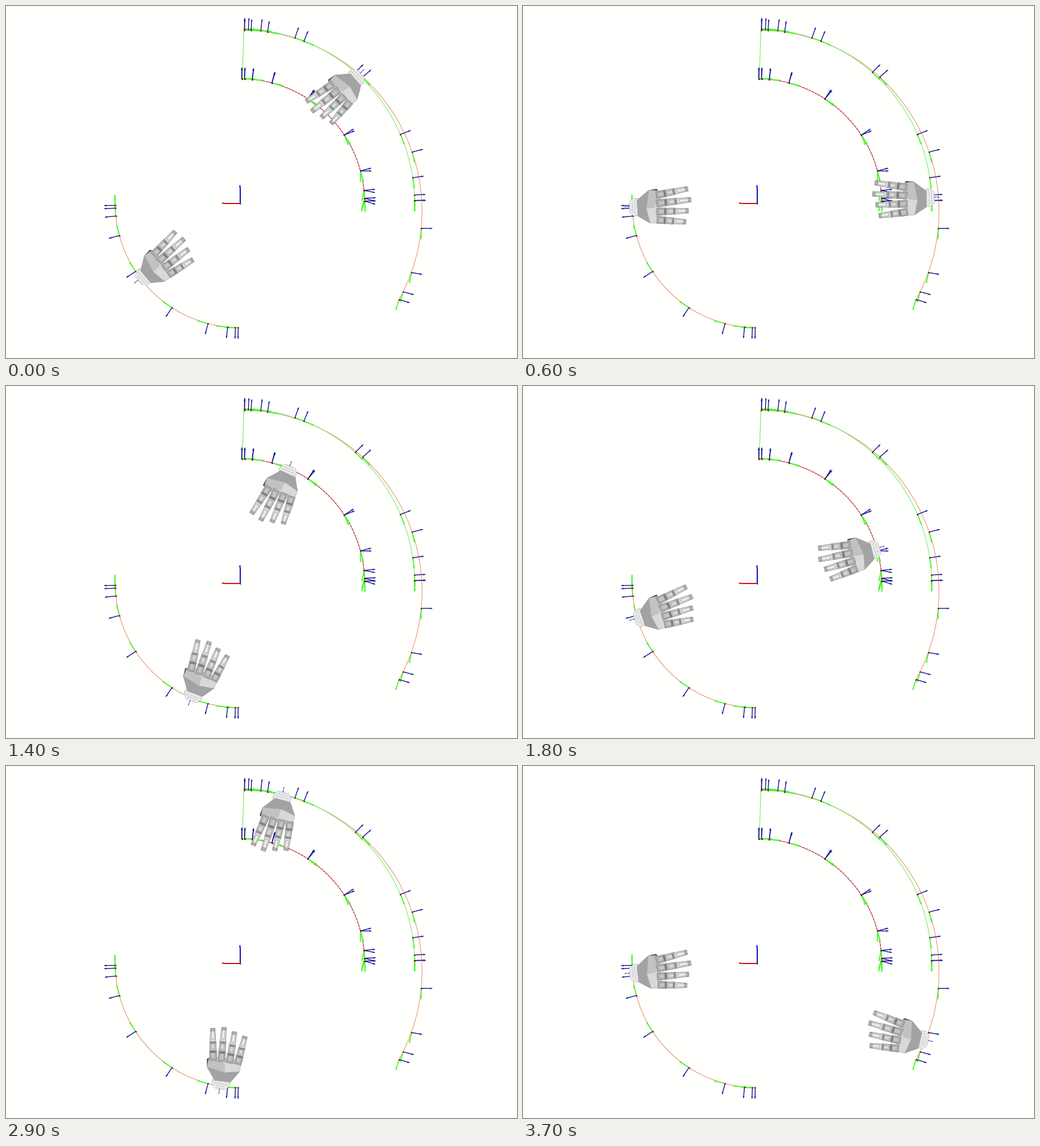
A matplotlib script for the animation above (3800 ms loop, 901 by 622 pixels).

```python
import numpy as np
import matplotlib.pyplot as plt
from matplotlib.animation import FuncAnimation
from matplotlib.patches import Polygon

W, H, DPI = 901, 622, 100
PX = 72 / DPI
CENTER = np.array([412, 348])
GREEN, NAVY, RED = "#46f828", "#0c0c96", "#d20a14"

fig = plt.figure(figsize=(W / DPI, H / DPI), dpi=DPI, facecolor="#fffffd")
ax = fig.add_axes([0, 0, 1, 1])
ax.set(xlim=(-0.5, W - 0.5), ylim=(H - 0.5, -0.5))
ax.axis("off")


def direction(deg):
    a = np.radians(deg)
    return np.array([np.cos(a), -np.sin(a)])


def ease(u, steps, rate, middle):
    """Logistic progress, 0 at u=0 and 1 at u=steps."""
    def raw(v):
        return 1 / (1 + np.exp(-rate * (v - middle)))
    return (raw(np.clip(u, 0, steps)) - raw(0)) / (raw(steps) - raw(0))


def pose(center, radius, deg, tilt=0):
    """Position on an arc and the outward heading there."""
    return np.array([*(center + radius * direction(deg)), deg + tilt])


def inner_path(u, tilt=0):
    s = ease(u, 9, 1.085, 4.5)
    return pose(CENTER, 220, 89.2 - 88.2 * s, tilt * s)


def left_path(u):
    x, y, deg = inner_path(u)
    return np.array([*(2 * CENTER - (x, y)), deg + 180])


def short_path(u):
    s = ease(u, 8, 1.23, 4.15)
    return pose(CENTER, 308, 88.5 - 87.6 * s, -4 * np.sin(np.pi * s) ** 2)


def long_path(u):
    s = ease(u, 9, 0.97, 4.63)
    return pose(CENTER + (0, 12), 318 + 4 * s, 88.6 - 118 * s,
                12 * s - 13 * np.sin(np.pi * s) ** 2)


def line(points, color, width, z=1, **kw):
    return ax.plot(*np.transpose(points), color=color, lw=width * PX, zorder=z,
                   solid_capstyle="butt", **kw)[0]


def trace(path, color, width, **kw):
    line([path(u)[:2] for u in np.linspace(0, 9, 300)], color, width, **kw)


def arrow(start, deg, length, color, width, z=3):
    d = direction(deg)
    neck, tip = start + (length - 5) * d, start + length * d
    side = np.array([-d[1], d[0]]) * (width * 0.5 + 0.8)
    line([start, neck], color, width, z)
    ax.add_patch(Polygon([neck + side, tip, neck - side], fc=color, ec="none", zorder=z))


def dot(point, color, size):
    ax.plot(*point, "o", ms=size * PX, color=color, mew=0, zorder=4)


def triad(place):
    arrow(place[:2], place[2] - 90, 20.5, GREEN, 1.8, 2)
    arrow(place[:2], place[2], 20.5, NAVY, 1.4)
    dot(place[:2], "#8c0014", 2.6)


def draw_scene():
    trace(left_path, "#e0865c", 1)
    trace(inner_path, "#e58c96", 1)
    trace(inner_path, "#a81432", 1.1, ls=(0, (4, 1.5)))
    trace(long_path, "#e8875c", 1)
    trace(short_path, "#6cf06c", 1.1)
    line([(419, 42), (416, 128)], "#74ee5c", 1.2)
    for k in range(10):
        for place in (left_path(k), inner_path(k), inner_path(k, -18),
                      long_path(k), short_path(k)):
            triad(place)
    arrow(CENTER, 90, 33, "#0a0ac8", 2)
    arrow(CENTER, 180, 33, RED, 2)
    dot(CENTER, "#0a9628", 3)


def band(base, tip, a, b, wa, wb):
    """Tapered strip between fractions a and b of a finger's axis."""
    axis = tip - base
    side = np.array([-axis[1], axis[0]]) / np.hypot(*axis) / 2
    p, q = base + a * axis, base + b * axis
    return [p - side * wa, q - side * wb, q + side * wb, p + side * wa]


def finger(i):
    base = np.array([43, -19 + 14.5 * i])
    tip = np.array([104 - 5 * abs(i - 1), -29 + 19.5 * i])
    joints = (0, 0.3, 0.58, 1)
    for j, (a, b) in enumerate(zip(joints, joints[1:])):
        wide, tone, n = 12.5 - 1.2 * j, 0.68 + 0.08 * j, (b - a) / 5
        yield band(base, tip, a, b, wide, wide - 2 * (j == 2)), tone, 0.42
        yield band(base, tip, a + n, b - n, wide - 5, wide - 6), tone + 0.09, 0.6
        yield band(base, tip, b - n, b - n / 3, wide - 3, wide - 4), 0.5 + 0.12 * j, 0.45


def hand_parts():
    """Outline as (forward, sideways) offsets from the wrist, fill grey, edge grey."""
    heel_a, heel_b = (9, -11), (10, 17)
    side_a, side_b = (30, -28), (31, 30)
    top_a, top_b = (46, -27), (45, 30)
    ridge, crest = (25, 4), (40, 2)
    yield [(-5, -9), (-5, 10), (3, 17), (10, 16), (11, -15), (3, -15)], 0.93, 0.68
    for x in (-3, 1, 5):
        yield [(x, -9 - x), (x, 10 + x), (x + 3, 10 + x), (x + 3, -9 - x)], 0.95, 0.74
    yield [side_a, (44, -30), top_a, (31, -24)], 0.3, 0.3
    yield [heel_a, heel_b, side_b, top_b, (49, 22), (49, -18), top_a, side_a], 0.87, 0.55
    yield [heel_a, heel_b, side_b, ridge, side_a], 0.64, 0.6
    yield [side_a, ridge, crest, top_a], 0.76, 0.68
    yield [ridge, side_b, top_b, crest], 0.85, 0.74
    for i in range(4):
        yield from finger(i)


class Hand:
    def __init__(self, mirror):
        self.mirror = mirror
        self.shapes = []
        for points, tone, edge in hand_parts():
            patch = Polygon(points, fc=str(tone), ec=str(edge), lw=0.6 * PX, zorder=6)
            self.shapes.append((ax.add_patch(patch), np.array(points, float)))
        self.tick = line([(0, 0), (0, 0)], NAVY, 1, 7, ls=(0, (4, 1)))

    def place(self, place):
        wrist, f = place[:2], -direction(place[2])
        e = np.array([f[1], -f[0]]) * (-1 if self.mirror else 1)
        for patch, points in self.shapes:
            patch.set_xy(wrist + points @ np.array([f, e]))
        self.tick.set_data(*np.transpose([wrist - 5 * f, wrist - 14 * f]))


draw_scene()
left, right = Hand(True), Hand(False)


def update(frame):
    """Three passes; the left hand repeats its arc while the right one changes path."""
    t = frame * 100
    if t < 750:
        u = 0.006 * (t + 805)
        target = short_path(0.9 * u - 0.3)
    elif t < 2450:
        u = 0.006 * (t - 815)
        target = inner_path(u)
    else:
        u = 0.006 * (t - 2485)
        target = long_path(u)
    left.place(left_path(u))
    right.place(target)
    return []


anim = FuncAnimation(fig, update, frames=38, interval=100, repeat=True, repeat_delay=0)
plt.show()
```
